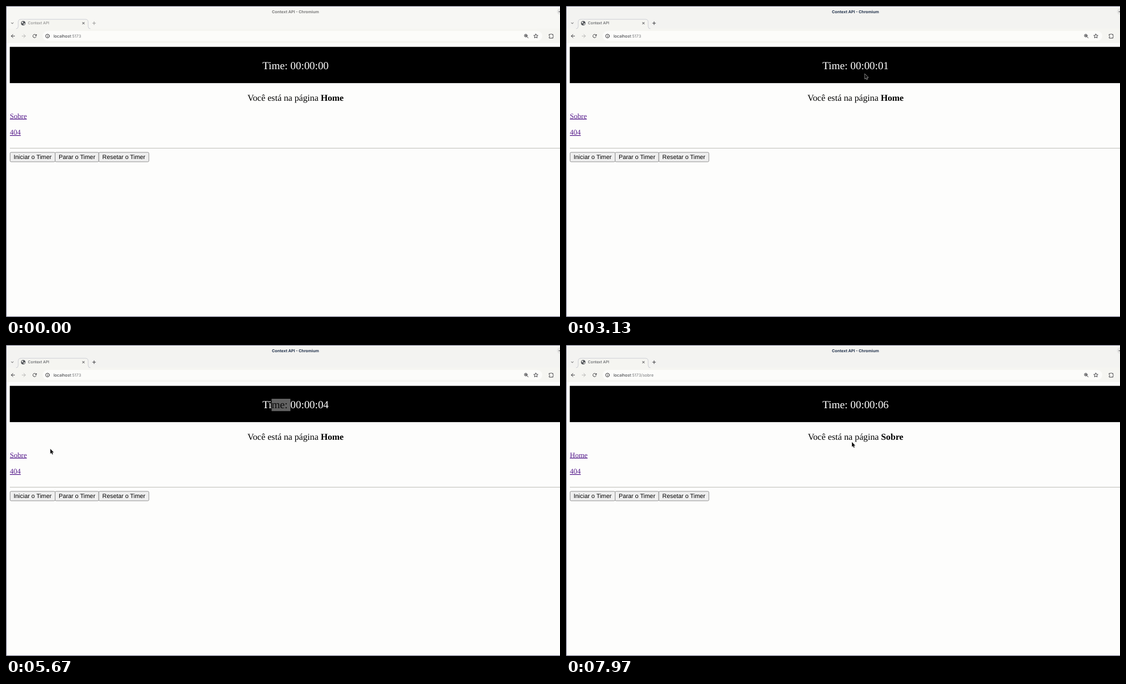
These frames come from a looping animation (998x561 px, 8 s). An HTML page:

```html
<!DOCTYPE html>
<html lang="pt-BR">
<head>
<meta charset="utf-8">
<title>Context API</title>
<style>
  html, body { margin: 0; width: 100%; height: 100%; overflow: hidden; background: #fdfdfc; }
  svg { display: block; width: 998px; height: 561px; }
  text { white-space: pre; text-rendering: geometricPrecision; }
  .ui { font-family: Inter, sans-serif; font-size: 7.4px; }
  .page { font-family: "Liberation Serif", serif; font-size: 13.06px; }
  .time { font-size: 19.4px; text-anchor: middle; }
  .sub { font-size: 16.2px; text-anchor: middle; }
  .link { fill: #551a8b; text-decoration: underline; }
  .btn rect { fill: #efefef; stroke: #858585; stroke-width: .9; }
  .btn.hover rect { fill: #e3e3e3; }
  .btn text { font: 10.88px "Liberation Sans", sans-serif; }
  .icon { fill: none; stroke: #3c3c40; stroke-linecap: round; stroke-linejoin: round; }
  .dim { stroke: #b4b4b3; }
  .title { font-size: 7.2px; font-weight: 700; text-anchor: middle; fill: #26364f; }
  .tab { font-size: 6.9px; fill: #45474c; }
  .blur .title, .blur .tab { fill: #7d7d7d; }
  .blur .plus { stroke: #999; }
  .blur .frame { fill: #f7f7f4; }
  #pointer path { fill: #111; stroke: #fff; paint-order: stroke; }
  #beam path { fill: none; stroke-width: 1.8; }
</style>
</head>
<body>
<svg viewBox="0 0 998 561">
  <defs>
    <clipPath id="clip"><rect id="sel" y="97" height="22.5"/></clipPath>
    <path id="back" d="M3 0H-3M0-3L-3 0L0 3"/>
    <path id="plus" d="M-2.7 0H2.7M0-2.7V2.7"/>
    <path id="ibeam" d="M-2-5H2M0-5V5M-2 5H2"/>
  </defs>

  <g id="chrome" class="ui">
    <rect class="frame" width="998" height="41" fill="#f3f3f1"/>
    <rect y="41" width="998" height="26" fill="#f5f5f1"/>
    <rect x="66" y="45" width="900" height="18" rx="9" fill="#fcfcfa"/>
    <path d="M18 41q4 0 4-4v-8q0-5 5-5h116q5 0 5 5v8q0 4 4 4" fill="#f5f5f1" stroke="#c3c4cd" stroke-width=".8"/>
    <text class="title" x="521.4" y="12.6">Context API - Chromium</text>
    <text class="tab" x="39.5" y="33.4">Context API</text>
    <text x="85.5" y="56.9" fill="#33353a">localhost<tspan id="path" fill="#76787b">:5173</tspan></text>
    <circle cx="998" cy="10" r="5.5" fill="#e5e5e4"/>
    <circle cx="31" cy="31" r="4" fill="#505357"/>
    <path d="M28 29l3-1v2l-2 2zM31 32l3-1v2l-2 1z" fill="#e9e9e8"/>
    <g class="icon">
      <path d="M996 10.3h2M9.7 30.2l1.7 1.7l1.7-1.7"/>
      <use href="#plus" transform="translate(139.5 31) rotate(45) scale(.9)"/>
      <use href="#plus" class="plus" x="158.7" y="31"/>
      <use href="#back" x="12.5" y="54.2"/>
      <use href="#back" class="dim" transform="translate(32 54.2) scale(-1 1)"/>
      <path d="M54.3 55.2a3 3 0 1 1-.6-3l1 1v-2v2h-2"/>
      <circle cx="74.8" cy="54.2" r="3.4"/>
      <path d="M74.8 54v2m0-3.6v.1"/>
      <circle cx="936.4" cy="53.4" r="2.5"/>
      <path d="M938.3 55.3l2.4 2.4m-5.4-4.3h2.2m-1.1-1v2"/>
      <path id="star" transform="translate(954.5 54.4)"/>
      <path d="M978.7 51.2h2.3q1-2 2 0h2.3v2.2q2 1 0 2.2v2.4h-6.6v-2.2q2-1.200 0-2.400z"/>
    </g>
  </g>

  <g class="page">
    <rect x="6.8" y="73.7" width="992" height="65.4"/>
    <text id="time" class="time" x="521.6" y="114.3" fill="#fff">Time: 00:00:00</text>
    <g clip-path="url(#clip)">
      <rect x="450" y="97" width="150" height="22.5" fill="#626262"/>
      <text id="timeSel" class="time" x="521.6" y="114.3" fill="#0a0a0a">Time: 00:00:00</text>
    </g>
    <text class="sub" x="521.7" y="171">Você está na página <tspan id="here" font-weight="700">Home</tspan></text>
    <text id="other" class="link" x="7" y="202.5">Sobre</text>
    <text class="link" x="7" y="231.9">404</text>
    <rect x="7" y="256" width="991" height="1" fill="#bcbcb8"/>
    <g id="buttons"></g>
  </g>

  <g id="status" class="ui">
    <path id="bubble" fill="#ededeb"/>
    <text id="statusText" x="3" y="557" style="font-size:6.95px" fill="#4a4c50"></text>
  </g>

  <path d="M0 .5H998M.5 0V561M0 560.5H998" fill="none" stroke="#66667c"/>

  <g id="pointer">
    <path id="arrow" d="M0 0v8.8l2-1.800l1.400 3.200l1.500-.7l-1.400-3h2.800z"/>
    <path id="hand" d="M-1 .5q1-1.200 2 0v3l4 .8q1.200.4 1 1.700l-.8 3.800h-6l-2.600-3.500q-.1-1.500 2.400-.3z"/>
    <g id="beam">
      <use href="#ibeam" fill="none" stroke="#aaa" stroke-width="1.8"/>
      <use href="#ibeam" fill="none" stroke="#222" stroke-width=".8"/>
    </g>
  </g>
</svg>
<script>
  const LOOP = 8000, FOCUS = 400, START = 1470, DRAG = 3570, DROP = 3900, RENDER = 4470, NAV = 6350;
  const NS = 'http://www.w3.org/2000/svg';
  const $ = id => document.getElementById(id);
  const show = (id, on) => $(id).setAttribute('visibility', on ? 'visible' : 'hidden');
  const put = (id, s) => { if ($(id).textContent !== s) $(id).textContent = s; };

  // Each glide of the pointer: start, end, and the place it reaches
  const glides = [
    [30, 800, 100, 318],
    [870, 1470, 45, 274],    // Iniciar
    [2070, 2270, 208, 225],
    [2730, 3530, 585, 108],  // right end of the time
    [3570, 3870, 483, 106],  // drag over it
    [3900, 4370, 420, 142],
    [4390, 5170, 315, 154.5],
    [5330, 6130, 25, 195],   // link
    [7000, 7330, 21, 200],
    [7470, 7970, 515, 175]
  ];

  function pointerAt(t) {
    let x = 250, y = -14;
    for (const [from, to, gx, gy] of glides) {
      if (t < from) break;
      const k = 1 - (1 - Math.min(1, (t - from) / (to - from))) ** 3;
      x += (gx - x) * k;
      y += (gy - y) * k;
    }
    return { x, y };
  }

  function add(parent, tag, attrs) {
    const el = document.createElementNS(NS, tag);
    for (const k in attrs) el.setAttribute(k, attrs[k]);
    return parent.appendChild(el);
  }

  function addButtons() {
    const pad = 6.4;
    let x = 7.4;
    for (const word of ['Iniciar', 'Parar', 'Resetar']) {
      const g = add($('buttons'), 'g', { class: 'btn' });
      const box = add(g, 'rect', { x, y: 264, height: 17, rx: 1.8 });
      const label = add(g, 'text', { x: x + pad, y: 276.4 });
      label.textContent = word + ' o Timer';
      const width = label.getComputedTextLength() + 2 * pad;
      box.setAttribute('width', width);
      x += width;
    }
  }

  function drawStar() {
    const points = Array.from({ length: 10 }, (_, i) => {
      const r = i % 2 ? 1.9 : 4, a = i * Math.PI / 5;
      return [r * Math.sin(a), -r * Math.cos(a)];
    });
    $('star').setAttribute('d', 'M' + points.join('L') + 'Z');
  }

  function select(t) {
    const text = $('time'), n = text.getNumberOfChars();
    const edges = Array.from({ length: n }, (_, i) => text.getStartPositionOfChar(i).x);
    edges.push(text.getEndPositionOfChar(n - 1).x);
    const { x } = pointerAt(Math.min(t, DROP));
    const from = edges.reduce((a, b) => Math.abs(b - x) < Math.abs(a - x) ? b : a);
    const to = t < RENDER ? edges[n] : edges['Time: '.length];
    $('sel').setAttribute('x', from);
    $('sel').setAttribute('width', t >= DRAG && t < NAV ? to - from : 0);
  }

  function draw() {
    const t = performance.now() % LOOP;
    const { x, y } = pointerAt(t);
    const inside = (l, top, r, b) => x >= l && x <= r && y >= top && y <= b;
    const about = t >= NAV;

    $('chrome').classList.toggle('blur', t < FOCUS);
    const time = 'Time: 00:00:0' + Math.max(0, Math.floor((t - START) / 1000));
    put('time', time);
    put('timeSel', time);
    select(t);

    put('path', about ? ':5173/sobre' : ':5173');
    put('here', about ? 'Sobre' : 'Home');
    put('other', about ? 'Home' : 'Sobre');
    $('buttons').firstChild.classList.toggle('hover', inside(7, 264, 88, 281));

    show('status', t >= 6170 && t < 7570);
    put('statusText', about ? 'localhost:5173' : 'localhost:5173/sobre');
    $('bubble').setAttribute('d', `M0 548H${about ? 53 : 75}q2 0 2 2V561H0Z`);

    const hand = inside(7, 191, 39, 207);
    const beam = inside(455, 97, 590, 119) || inside(434, 157, 609, 174);
    show('hand', hand);
    show('beam', beam);
    show('arrow', !hand && !beam);
    $('pointer').setAttribute('transform', `translate(${x} ${y})`);
    requestAnimationFrame(draw);
  }

  addButtons();
  drawStar();
  draw();
</script>
</body>
</html>
```
